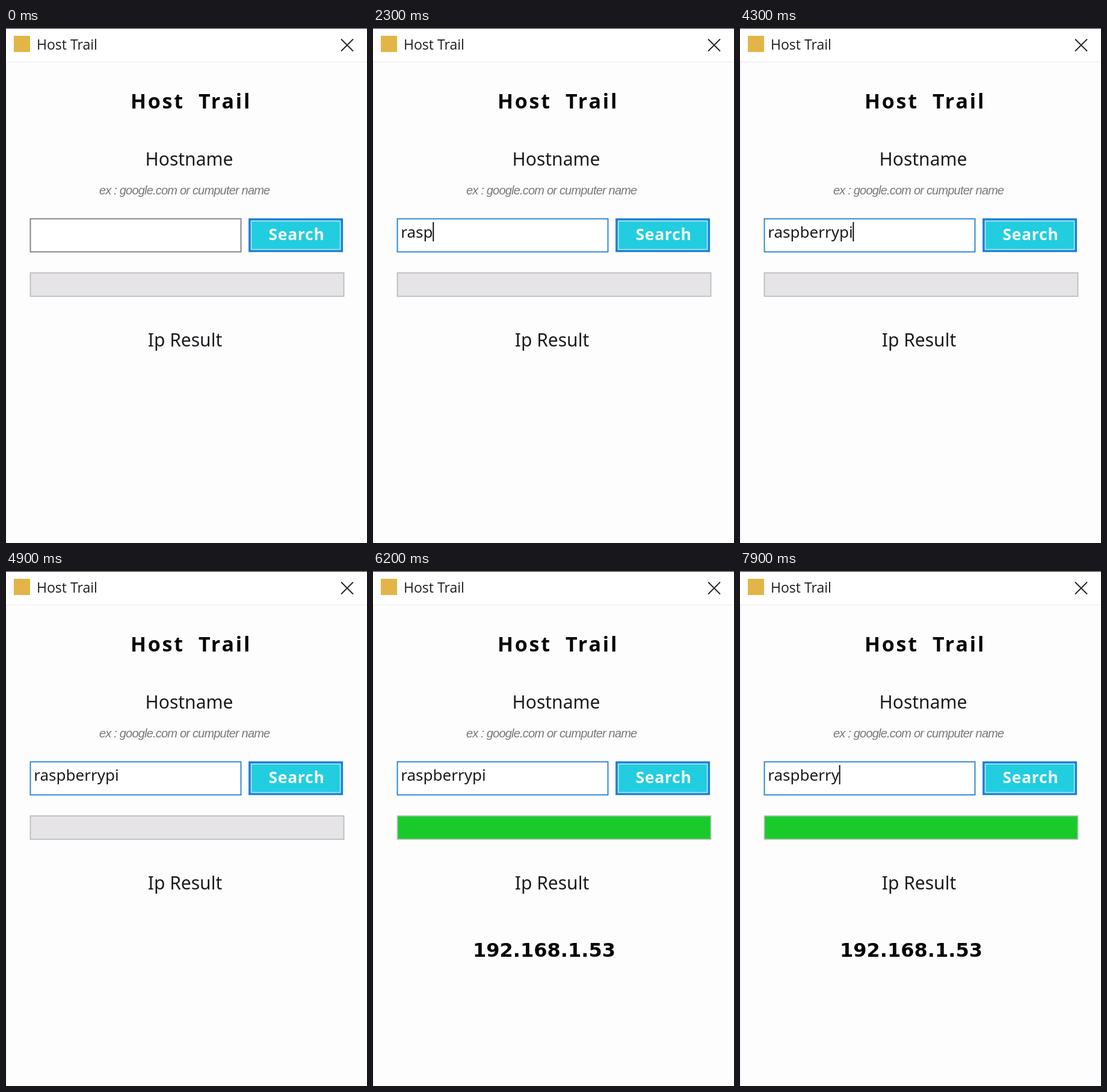
An HTML page for the animation above (8 s loop, 600 px wide and 857 px high).

```html
<!DOCTYPE html>
<html lang="en">
<head>
<meta charset="utf-8">
<title>Host Trail</title>
<style>
  html, body { margin: 0; width: 100%; height: 100%; overflow: hidden; background: #fefdfe; }
  svg { display: block; width: 100vw; height: 100vh; }
  text { font-family: "Noto Sans", "Open Sans", sans-serif; fill: #1c1c20; white-space: pre; }
  .mid { text-anchor: middle; }
  .bold { font-weight: 700; fill: #050505; }
</style>
</head>
<body>
<svg viewBox="0 0 600 857">
  <rect width="600" height="857" fill="#fefdfe"/>
  <!-- title bar -->
  <rect width="600" height="56" fill="#fff"/>
  <rect width="600" height="1.3" fill="#47474b"/>
  <path d="M0 56.5H600M.5 56V857" stroke="#e9e9ed" fill="none"/>
  <rect x="13" y="13" width="27" height="27" fill="#e3b548"/>
  <text x="51" y="36" font-size="23" style="font-family:'Open Sans',sans-serif">Host Trail</text>
  <path d="M557 18.5L577 38.5M577 18.5L557 38.5" stroke="#222" stroke-width="1.8"/>

  <text class="mid bold" x="307.5" y="134" font-size="34" letter-spacing="2.8">Host  Trail</text>
  <text class="mid" x="304.5" y="229" font-size="30">Hostname</text>
  <text x="155" y="277" font-size="20" letter-spacing="-.8" font-style="italic"
    style="font-family:'Liberation Sans',Arial,sans-serif;fill:#77777a">ex : google.com or cumputer name</text>

  <!-- input -->
  <rect id="box" x="40.5" y="317.5" width="350" height="55" fill="#fff" stroke-width="2"/>
  <text id="entry" x="46.3" y="349" font-size="26"></text>
  <rect id="caret" y="323" width="2" height="32" fill="#111"/>

  <!-- button -->
  <rect x="405" y="318.6" width="153.2" height="52.4" fill="#22cde0" stroke="#1b82d8" stroke-width="3.8"/>
  <rect x="407.6" y="321.2" width="148" height="47.4" fill="none" stroke="#bde6f4" stroke-width="1.6"/>
  <text class="mid bold" x="483" y="353" font-size="26.5" letter-spacing=".7" style="fill:#f4fcfd">Search</text>

  <!-- progress -->
  <rect id="bar" x="40.5" y="407.5" width="521" height="39" stroke="#bbbbbf" stroke-width="1.8"/>

  <text class="mid" x="297.5" y="529.5" font-size="30">Ip Result</text>
  <text id="result" class="mid bold" x="284.5" y="642" font-size="32"
    style="font-family:'DejaVu Sans',sans-serif">192.168.1.53</text>
</svg>
<script>
const $ = id => document.getElementById(id);
const [box, entry, caret, bar, result] = ['box', 'entry', 'caret', 'bar', 'result'].map($);
const LOOP = 8000, BLINK = 530, HOST = 'raspberrypi';
const FOCUS = 1000, TYPE = 1850, KEY = 130, CLICK = 5500, DONE = 5800, REFOCUS = 6000;
const ERASE = [7600, 7800];
const typedAt = TYPE + KEY * (HOST.length - 1);

function letters(t) {
  if (t < TYPE) return 0;
  const typed = Math.min(HOST.length, Math.floor((t - TYPE) / KEY) + 1);
  return typed - ERASE.filter(e => t >= e).length;
}

// Each keystroke restarts the caret blink.
function caretOn(t) {
  if (t < FOCUS) return false;
  let start = FOCUS;
  if (t >= TYPE) start = Math.min(t, typedAt);
  for (const e of ERASE) if (t >= e) start = e;
  return (t - start) % (2 * BLINK) < BLINK;
}

function draw(t) {
  entry.textContent = HOST.slice(0, letters(t));
  caret.setAttribute('x', 46 + entry.getComputedTextLength());
  caret.style.opacity = caretOn(t) ? 1 : 0;
  const active = t >= FOCUS && (t < CLICK || t >= REFOCUS);
  box.setAttribute('stroke', active ? '#2f89cd' : '#84858c');
  bar.setAttribute('fill', t >= DONE ? '#18cb2b' : '#e6e4e7');
  result.style.opacity = t >= DONE ? 1 : 0;
}

const origin = performance.now();
function frame() {
  draw((performance.now() - origin) % LOOP);
  requestAnimationFrame(frame);
}
frame();
</script>
</body>
</html>
```
